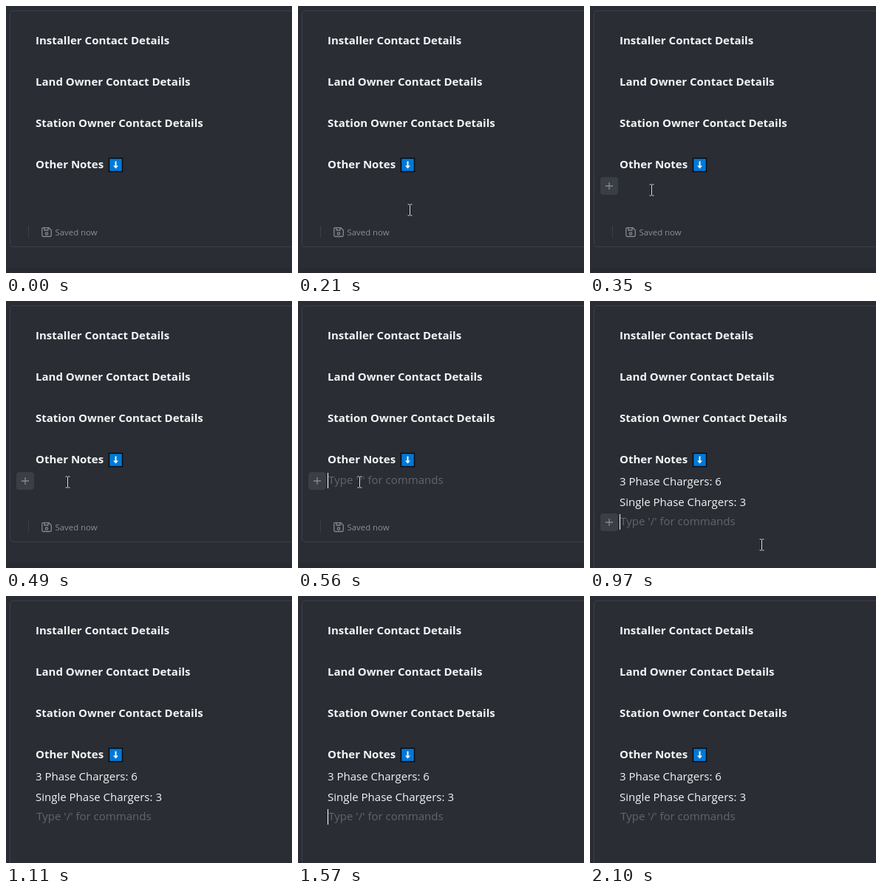
Animation, 387 px wide and 362 px high, one loop 2630 ms. Source, as an HTML page:

```html
<!DOCTYPE html>
<html lang="en">
<head>
<meta charset="utf-8">
<title>Notes editor</title>
<style>
  html, body { margin: 0; width: 100%; height: 100%; overflow: hidden; background: #2a2d34; }
  svg { display: block; width: 387px; height: 362px; font: 15px "Open Sans", "Noto Sans", sans-serif; fill: #f4f5f6; }
  .heading { font-weight: 700; }
  .hint { fill: #62656b; }
  .border { fill: none; stroke: #3c3f47; }
  .icon { fill: none; stroke: #858890; stroke-width: 1.3; }
  .saved { font-size: 11.4px; fill: #8b8e95; }
</style>
</head>
<body>
<svg viewBox="0 0 387 362">
  <g id="footer">
    <rect y="355" width="387" height="7" fill="#282a31"/>
    <rect class="border" x="5.5" y="6.5" width="390" height="320" rx="4"/>
    <path class="border" d="M30.5 298v16"/>
    <path class="icon" d="M50 300.7h8l3.3 3.3v7q0 1.500-1.500 1.500h-9.500q-1.500 0-1.500-1.500v-9q0-1.300 1.200-1.300zM52 301v3h5v-3"/>
    <circle class="icon" cx="55" cy="308.500" r="1.700"/>
    <text class="saved" x="66.500" y="311">Saved now</text>
  </g>
  <rect id="tallPanel" class="border" x="5.5" y="6.5" width="390" height="400" rx="4"/>

  <g class="heading">
    <text x="40" y="52">Installer Contact Details</text>
    <text x="40" y="108">Land Owner Contact Details</text>
    <text x="40" y="164">Station Owner Contact Details</text>
    <text x="40" y="220">Other Notes</text>
  </g>
  <rect x="139.500" y="206.500" width="18" height="18" fill="#0078d7" stroke="#08090c" stroke-width="1.400"/>
  <path d="M147.500 210.500h2v6h2.500l-3.500 4-3.500-4h2.500z"/>

  <g id="notes">
    <text x="40" y="250">3 Phase Chargers: 6</text>
    <text x="40" y="278">Single Phase Chargers: 3</text>
  </g>
  <g id="line">
    <g id="plus">
      <rect x="14" y="232" width="24" height="24" rx="4" fill="#3a3e45"/>
      <path class="icon" d="M21 244h10M26 239v10"/>
    </g>
    <text id="hint" class="hint" x="41.300" y="248">Type '/' for commands</text>
    <rect id="caret" x="40" y="233" width="1" height="21" fill="#fff"/>
  </g>
  <g id="pointer" fill="none">
    <path id="beam" d="M-3-7.500h2.500M.5-7.500h2.500M0-7v14M-3 7.500h2.500M.5 7.500h2.500" stroke="#17191d" stroke-width="2.400"/>
    <path d="M-3-7.500h2.500M.5-7.500h2.500M0-7v14M-3 7.500h2.500M.5 7.500h2.500" stroke="#e6e7e8"/>
  </g>
</svg>
<script>
const LOOP = 2630, STEP = 70;
const get = id => document.getElementById(id);
const show = (id, on) => get(id).setAttribute("visibility", on ? "visible" : "hidden");
const move = (id, x, y) => get(id).setAttribute("transform", `translate(${x} ${y})`);

// Pointer positions, one per step, for each of its two passes.
const passes = [
  { start: 70, points: [[293, 354], [222, 309], [151, 276], [102, 256], [83, 249], [83, 247], [83, 245], [83, 245]] },
  { start: 690, points: [[84, 246], [91, 250], [114, 264], [158, 290], [232, 330], [310, 362]] }
];

function pointerAt(t) {
  const pass = passes[t < 690 ? 0 : 1];
  const i = Math.floor((t - pass.start) / STEP);
  if (i < 0 || t >= 1110) return null;
  return pass.points[Math.min(i, pass.points.length - 1)];
}

function draw(now) {
  const t = now % LOOP;
  const filled = t >= 970;
  const pointer = pointerAt(t);

  show("footer", !filled);
  show("tallPanel", filled);
  show("notes", filled);
  move("line", 0, filled ? 56 : 0);
  show("plus", t >= 280 && t < 1110);
  show("hint", t >= 560);
  show("caret", (t >= 560 && t < 1110) || (t >= 1570 && t < 2100));

  show("pointer", pointer);
  if (pointer) move("pointer", pointer[0] + .5, pointer[1] + .5);
}

const begin = performance.now();
function tick() {
  draw(performance.now() - begin);
  requestAnimationFrame(tick);
}
tick();
</script>
</body>
</html>
```
